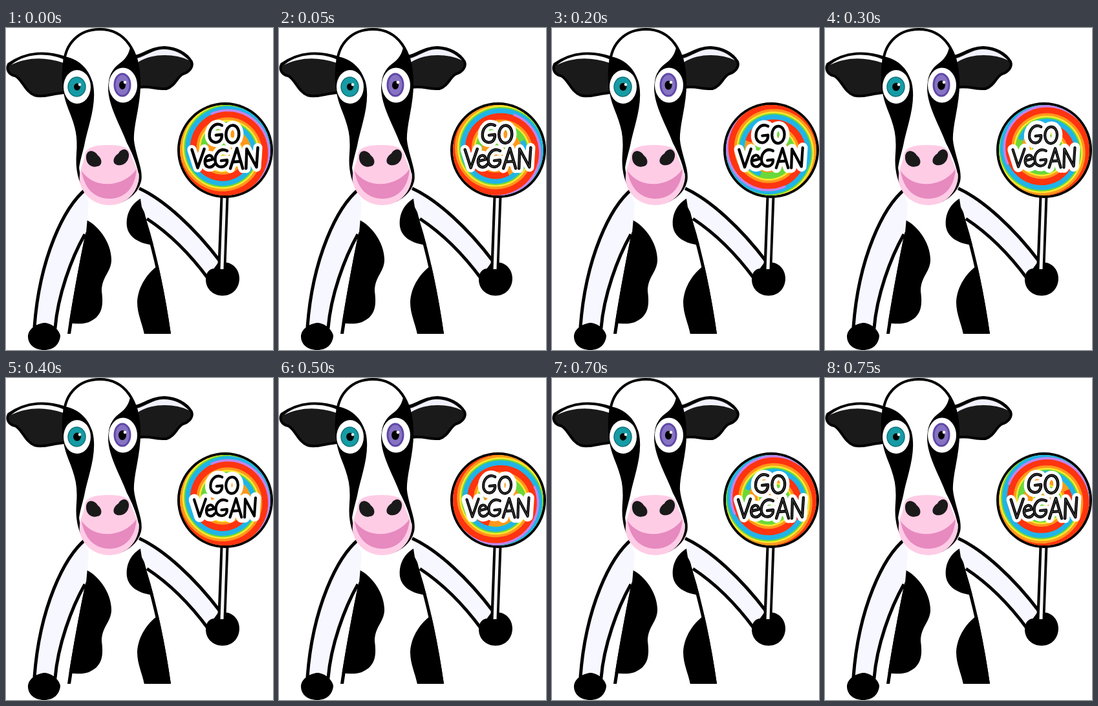
These frames come from a looping animation (413x498 px, 800 ms). An HTML page:

```html
<!DOCTYPE html>
<html lang="en">
<head>
<meta charset="utf-8">
<title>Go vegan cow</title>
<style>
html, body { margin: 0; width: 100%; height: 100%; overflow: hidden; background: #fff; }
svg { display: block; width: 100vw; height: 100vh; }
.line { fill: none; stroke-linecap: round; stroke-linejoin: round; }
</style>
</head>
<body>
<svg viewBox="0 0 413 498" role="img" aria-label="Cow holding a round sign: GO VeGAN">
  <defs>
    <clipPath id="disc"><circle cx="339" cy="189" r="70"/></clipPath>
    <clipPath id="face"><use href="#head"/></clipPath>
    <clipPath id="torso"><use href="#trunk"/></clipPath>
    <path id="head" d="M145 2C112 2 92 25 90 53C87 77 88 99 98 124C110 153 113 168 111 194C109 218 113 236 123 251C133 266 146 271 160 271C181 271 202 257 207 237C211 220 198 196 196 174C194 151 207 119 206 85C206 35 184 2 145 2Z"/>
    <path id="trunk" d="M126 255L123 318C116 350 103 420 95 473L255 473C247 416 234 351 217 297L207 255Z"/>
    <path id="words" class="line" d="M334 151C323 145 314 156 315 168C317 181 335 180 334 165L325 166M350 151C337 152 337 178 350 178C364 177 363 150 350 151ZM288 188L297 216L307 187M308 206L320 203C319 194 309 195 308 206C308 217 318 217 322 211M342 190C330 184 322 196 324 207C326 218 343 217 342 204L333 205M347 217L357 186L366 217M350 207L363 206M371 217L372 187L387 215L389 185"/>
  </defs>

  <!-- body -->
  <use href="#trunk" fill="#fff"/>
  <g clip-path="url(#torso)">
    <path d="M118 294C142 302 164 333 163 360C162 378 148 385 148 407C151 430 149 446 128 455C116 459 106 457 90 455Z"/>
    <path d="M209 263C191 274 185 291 187 307C190 326 211 337 240 336L230 280Z"/>
    <path d="M240 364C219 377 204 400 203 424C203 443 211 457 214 474H258Z"/>
    <path class="line" stroke="#000" stroke-width="10" d="M123 318C116 350 103 420 95 473M217 297C234 351 247 416 255 473"/>
  </g>

  <!-- arms -->
  <g fill="#f7f7ff" stroke="#000" stroke-width="5" stroke-linejoin="round">
    <path d="M124 249C90 276 52 355 44 462L76 464C80 414 101 356 122 319"/>
    <path d="M206 248C245 266 292 309 332 362L313 388C285 350 253 318 218 295"/>
  </g>
  <path d="M121 252L128 272L124 316L118 319L119 280Z" fill="#f7f7ff"/>
  <path d="M207 258L216 270L217 291L210 277Z" fill="#f7f7ff"/>
  <path d="M58 456C68 455 82 465 84 476C83 489 74 498 59 498C44 498 33 489 34 475C36 464 47 458 58 456Z"/>

  <!-- ears -->
  <g fill="#1a1a1a" stroke="#000" stroke-width="4" stroke-linejoin="round">
    <path d="M92 46C64 36 32 36 4 56C0 64 4 72 14 74C25 79 29 98 44 104C58 108 72 101 92 100Z"/>
    <path d="M200 44C212 42 226 30 245 30C264 31 279 39 287 52C290 60 284 68 274 71C264 76 262 90 248 94C233 95 222 89 204 92Z"/>
  </g>
  <path fill="#fff" d="M8 57C31 38 66 38 90 49L89 54C60 44 32 45 8 57Z"/>
  <path fill="#f2f2ff" d="M203 47C215 44 228 33 243 33C261 33 273 40 283 50C262 40 228 38 204 53Z"/>

  <!-- head -->
  <use href="#head" fill="#fff"/>
  <g clip-path="url(#face)">
    <path d="M84 43C109 45 127 60 134 84C142 117 126 154 121 182C118 195 114 206 112 224L84 224Z"/>
    <path d="M206 14L193 22C192 36 188 45 178 53C166 61 160 72 159 83C153 113 177 150 187 178C195 193 201 207 205 225L216 225Z"/>
  </g>
  <use href="#head" class="line" stroke="#000" stroke-width="4"/>
  <path fill="#ffcce6" d="M158 181C179 181 190 184 193 195C197 208 206 221 205 236C201 259 182 274 160 274C137 274 118 259 114 237C112 220 121 209 122 196C123 185 137 181 158 181Z"/>
  <path fill="#e68abf" d="M117 221C135 249 181 248 202 218C200 248 183 264 160 264C137 264 121 248 117 221Z"/>
  <path fill="#1a1a1a" d="M124 198C126 187 137 189 142 197C149 202 150 213 141 214C131 217 123 209 124 198ZM190 195C188 185 178 186 174 194C166 199 163 209 172 212C182 214 191 206 190 195Z"/>

  <!-- eyes -->
  <ellipse cx="110" cy="91" rx="21" ry="26" fill="#fff"/>
  <ellipse cx="109.500" cy="91" rx="13.500" ry="15" fill="#169ba4" stroke="#0b737c" stroke-width="1.500"/>
  <ellipse cx="181" cy="88.500" rx="22" ry="27" fill="#fff"/>
  <ellipse cx="180" cy="88" rx="12" ry="17" fill="#8673c2" stroke="#6048a8" stroke-width="3"/>
  <ellipse id="pupilL" cx="110" cy="91"/>
  <ellipse id="pupilR" cx="180" cy="88.500"/>
  <circle cx="114" cy="87.500" r="2.200" fill="#fff"/>
  <circle cx="184" cy="84" r="2.300" fill="#fff"/>

  <!-- sign -->
  <path class="line" stroke="#000" stroke-width="13" d="M338 260L334 367"/>
  <path d="M334 363C348 360 361 372 361 387C361 403 350 414 335 414C320 414 309 403 309 389C309 374 320 370 326 373Z"/>
  <path fill="none" stroke="#f5f5f5" stroke-width="5" d="M338 260L334 373"/>
  <circle cx="339" cy="189" r="74"/>
  <g clip-path="url(#disc)"><g id="swirl"><circle cx="339" cy="189" r="70" fill="#ffe82e"/></g></g>
  <g id="label">
    <use id="halo" href="#words" stroke="#fff"/>
    <use href="#words" stroke="#000" stroke-width="4.400"/>
    <use id="shine" href="#words" stroke="#777" stroke-width="1.200"/>
  </g>
</svg>
<script>
const $ = id => document.getElementById(id);
const CX = 339, CY = 189, R = 70, PITCH = 26;
const STEP = 50, STEPS = 16;

// colour, start and end in turns, innermost radius
const bands = [
  ["#ff981c", 0.12, 0.66, 0],
  ["#ffe82e", 0.66, 0.76, 0],
  ["#6bd83a", 0.76, 1.12, 0],
  ["#ff3410", 0.10, 0.48, 38],
  ["#20b4e8", 0.84, 1.10, 40],
  ["#c583ee", 1.02, 1.13, 60]
];

function spiral(turn, inner) {
  let d = "";
  for (let r = inner; r <= R + 2 * PITCH; r += 0.5) {
    const a = 2 * Math.PI * (turn + (r - R) / PITCH);
    const x = CX + r * Math.cos(a), y = CY + r * Math.sin(a);
    d += (d ? "L" : "M") + x.toFixed(1) + " " + y.toFixed(1);
  }
  return d;
}

for (const [color, from, to, inner] of bands) {
  const path = document.createElementNS("http://www.w3.org/2000/svg", "path");
  path.setAttribute("d", spiral((from + to) / 2, inner));
  path.setAttribute("fill", "none");
  path.setAttribute("stroke", color);
  path.setAttribute("stroke-width", (to - from) * PITCH + 0.7);
  $("swirl").append(path);
}

function setPupil(id, rx, ry) {
  $(id).setAttribute("rx", rx);
  $(id).setAttribute("ry", ry);
}

function draw(ms) {
  const k = Math.floor(ms / STEP) % STEPS;
  const swell = (1 - Math.cos(2 * Math.PI * k / STEPS)) / 2;
  const size = 1.01 - 0.07 * swell;
  $("swirl").setAttribute("transform", `rotate(${k * 45} ${CX} ${CY})`);
  $("label").setAttribute("transform", `translate(${CX} ${CY}) scale(${size}) translate(${-CX} ${-CY})`);
  $("halo").setAttribute("stroke-width", 14 + 4 * swell);
  $("shine").setAttribute("opacity", k % 4 ? 0.6 : 0);
  setPupil("pupilL", 5 + swell, 5.5 + swell);
  setPupil("pupilR", 5 + swell, 6.5 + swell);
}

const start = performance.now();
function tick() {
  draw(performance.now() - start);
  requestAnimationFrame(tick);
}
tick();
</script>
</body>
</html>
```
